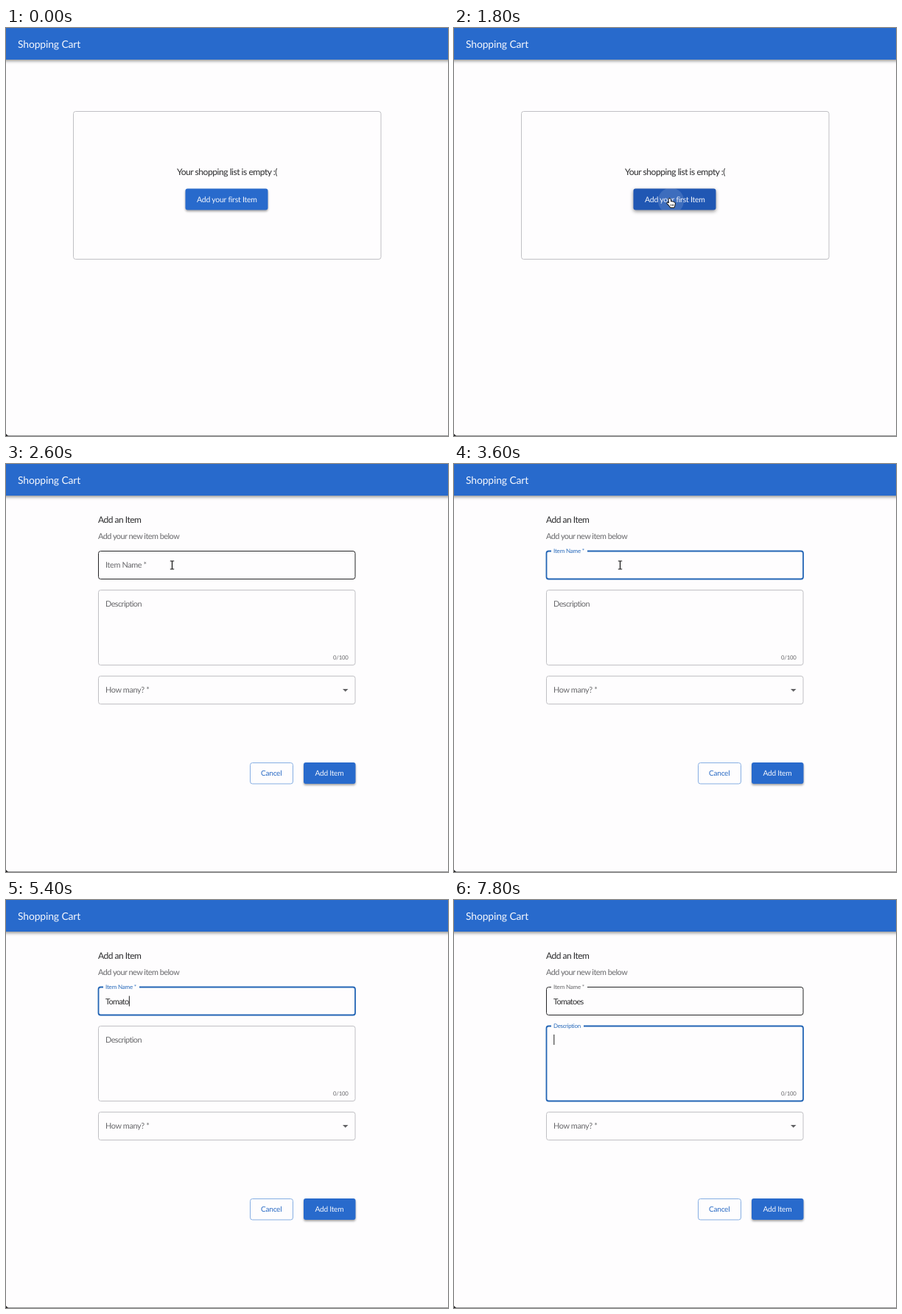
Recreate the animation shown at these times as an HTML page with a canvas. Size 600 by 555 pixels, loop 8000 ms.

```html
<!DOCTYPE html>
<html lang="en">
<head>
<meta charset="utf-8">
<title>Shopping Cart</title>
<style>
html, body { margin: 0; width: 100%; height: 100%; overflow: hidden; background: #fefdfe; }
canvas { display: block; width: 600px; height: 555px; }
</style>
</head>
<body>
<canvas id="stage"></canvas>
<script>
const W = 600, H = 555, LOOP = 8000, STEP = 200;
const BLUE = '#286acc', FOCUS = '#2365b5', INK = '#2c2c2e', GREY = '#68686b', LINE = '#c0c0c4', PAGE = '#fefdfe';
const canvas = document.getElementById('stage');
const ctx = canvas.getContext('2d');
const dpr = window.devicePixelRatio || 1;
canvas.width = W * dpr;
canvas.height = H * dpr;

const WORD = 'Tomatoes';
const NAME_FOCUS = 2750, DESC_FOCUS = 6400, PAGE_SWAP = 2000, TYPE_START = 4400, CLICK = 1680;
// time, x, y of the pointer
const PATH = [[400, 318, 438], [600, 314, 395], [800, 306, 325], [1000, 299, 263], [1200, 294, 238],
  [2000, 294, 238], [2200, 262, 192], [2400, 231, 143], [2600, 225.5, 137.5]];

const clamp = v => Math.max(0, Math.min(1, v));
const mix = (a, b, k) => a + (b - a) * k;
const easeOut = k => 1 - (1 - k) ** 3;

function text(str, x, y, size, color, tracking = 0) {
  ctx.font = `${size}px Lato, "Open Sans", sans-serif`;
  ctx.letterSpacing = tracking + 'px';
  ctx.fillStyle = color;
  ctx.fillText(str, x, y);
  return ctx.measureText(str).width;
}

function box(x, y, w, h, r = 3) {
  ctx.beginPath();
  ctx.roundRect(x, y, w, h, r);
}

function outline(x, y, w, h, color, width = 1) {
  box(x, y, w, h);
  ctx.strokeStyle = color;
  ctx.lineWidth = width;
  ctx.stroke();
}

function raised(x, y, w, h, r, color, dy, blur, alpha) {
  ctx.save();
  ctx.shadowColor = `rgba(0,0,0,${alpha})`;
  ctx.shadowOffsetY = dy * dpr;
  ctx.shadowBlur = blur * dpr;
  ctx.fillStyle = color;
  box(x, y, w, h, r);
  ctx.fill();
  ctx.restore();
}

function poly(points, fill, stroke, width = 1) {
  ctx.beginPath();
  points.forEach(([x, y]) => ctx.lineTo(x, y));
  ctx.closePath();
  if (stroke) {
    ctx.strokeStyle = stroke;
    ctx.lineWidth = width;
    ctx.lineJoin = 'round';
    ctx.stroke();
  }
  ctx.fillStyle = fill;
  ctx.fill();
}

function pointerAt(t) {
  for (let i = 1; i < PATH.length; i++) {
    const [t0, x0, y0] = PATH[i - 1], [t1, x1, y1] = PATH[i];
    if (t <= t1) {
      const k = clamp((t - t0) / (t1 - t0));
      return [mix(x0, x1, k), mix(y0, y1, k)];
    }
  }
  return PATH[PATH.length - 1].slice(1);
}

function arrow() {
  poly([[0, 0], [0, 10.5], [2.5, 8.2], [4.2, 12], [6, 11.2], [4.3, 7.5], [7.5, 7.3]], '#111', '#fff', 1.4);
}

function hand() {
  poly([[-2.4, -5.5], [-1.2, -6], [-.3, -5], [.4, -1.5], [2, -1.8], [3.4, -1.2], [5, -.7], [6, .6],
    [5.6, 3.4], [4.6, 6], [0, 6], [-2, 3], [-4.6, .6], [-4.2, -.6], [-2, .4]], '#fff', '#111', 1.8);
  ctx.fillStyle = '#111';
  for (const x of [.3, 2, 3.7]) ctx.fillRect(x, 1.6, .7, 2.6);
}

function ibeam() {
  const bars = grow => {
    ctx.fillRect(-.6 - grow, -5.5 - grow, 1.2 + 2 * grow, 11 + 2 * grow);
    for (const y of [-6, 5]) ctx.fillRect(-2.7 - grow, y - grow, 5.4 + 2 * grow, 1 + 2 * grow);
  };
  ctx.fillStyle = 'rgba(255,255,255,.8)';
  bars(.6);
  ctx.fillStyle = '#111';
  bars(0);
}

function pointer(t) {
  if (t < 400 || t >= TYPE_START) return;
  const [x, y] = pointerAt(t);
  ctx.save();
  ctx.translate(x, y);
  if (t >= PAGE_SWAP) ibeam();
  else if (t >= 1200) hand();
  else arrow();
  ctx.restore();
}

function header() {
  raised(-10, -10, W + 20, 53, 0, BLUE, 2, 4, .42);
  text('Shopping Cart', 16, 26.5, 13.9, '#f6f8fd', -.12);
}

function emptyPage(t) {
  outline(91.5, 113.5, 417.5, 201, LINE);
  text('Your shopping list is empty :(', 232, 200, 12.1, INK, -.49);
  const hover = t >= 1200;
  const fill = hover ? '#2057b3' : BLUE;
  raised(243.5, 218.5, 112, 29, 3, fill, 2, hover ? 5 : 3, hover ? .45 : .36);
  const k = clamp((t - CLICK) / 550);
  if (k > 0) {
    ctx.save();
    box(243.5, 218.5, 112, 29);
    ctx.clip();
    ctx.beginPath();
    ctx.arc(294.5, 235, mix(4, 62, easeOut(k) * .45), 0, 7);
    ctx.fillStyle = 'rgba(255,255,255,.13)';
    ctx.fill();
    ctx.restore();
  }
  text('Add your first Item', 259, 236.5, 10.5, '#f2f5fc', -.24);
}

// Outlined input whose label rises into a gap in the border.
function field(f, lift, focused, hovered) {
  const color = focused ? FOCUS : hovered ? '#242426' : LINE;
  outline(125.5, f.y, 348.5, f.h, color, focused ? 1.8 : 1);
  if (lift > 0) {
    const half = f.gap / 2 * lift;
    ctx.fillStyle = PAGE;
    ctx.fillRect(132 + f.gap / 2 - half, f.y - 2, half * 2, 4);
  }
  text(f.label, 135, mix(f.base, f.y + 2.8, lift), mix(10.9, f.small, lift),
    focused ? '#286abb' : GREY, mix(f.track, f.smallTrack, lift));
}

const NAME = { label: 'Item Name *', y: 118.5, h: 38, base: 141, gap: 49, track: -.37, small: 8, smallTrack: -.18 };
const DESC = { label: 'Description', y: 171.5, h: 102, base: 194, gap: 44, track: -.58, small: 7.9, smallTrack: -.3 };
const COUNT = { label: 'How many? *', y: 288.5, h: 38, base: 311, gap: 50, track: -.38, small: 8, smallTrack: -.2 };

function caret(x, y, since, t) {
  if ((t - since) % 1000 >= 500) return;
  ctx.fillStyle = '#222';
  ctx.fillRect(x, y, 1, 14);
}

function formPage(t) {
  text('Add an Item', 125, 80, 12, INK, -.5);
  text('Add your new item below', 125, 101.5, 10.9, GREY, -.52);

  const onDesc = t >= DESC_FOCUS, onName = t >= NAME_FOCUS && !onDesc;
  const lift = start => easeOut(clamp((t - start) / 200));
  field(NAME, lift(NAME_FOCUS), onName, t >= 2400);
  field(DESC, lift(DESC_FOCUS - 70), onDesc, t < 2400);
  field(COUNT, 0, false, false);

  const typed = WORD.slice(0, Math.max(0, Math.floor((t - TYPE_START) / STEP) + 1));
  const width = text(typed, 135, 141.7, 10.9, INK, -.68);
  if (onName) {
    const lastKey = TYPE_START + STEP * (WORD.length - 1);
    const since = t < TYPE_START ? NAME_FOCUS : Math.min(t, lastKey);
    caret(135.3 + width, 130.5, since, t);
  }
  if (onDesc) caret(135.3, 183, DESC_FOCUS, t);

  text('0/100', 444, 266.3, 7.8, GREY, -.2);
  poly([[457, 306], [464.5, 306], [460.75, 309.8]], '#626265');

  outline(331.5, 406.5, 58, 28.5, '#86aee3');
  text('Cancel', 346, 424, 10, '#2869c4', -.2);
  raised(404, 406, 70.5, 29, 3, BLUE, 2, 3, .36);
  text('Add Item', 419.5, 424, 10.2, '#f2f5fc', -.26);
}

function draw(t) {
  ctx.setTransform(dpr, 0, 0, dpr, 0, 0);
  ctx.textRendering = 'geometricPrecision';
  ctx.fillStyle = PAGE;
  ctx.fillRect(0, 0, W, H);
  if (t < PAGE_SWAP) emptyPage(t);
  else formPage(t);
  header();
  ctx.fillStyle = '#969698';
  ctx.fillRect(0, 554, W, 1);
  poly([[0, 552], [3, 555], [0, 555]], '#222');
  pointer(t);
}

function tick() {
  const t = performance.now() % LOOP;
  draw(Math.floor(t / STEP) * STEP);
  requestAnimationFrame(tick);
}
tick();
</script>
</body>
</html>
```
